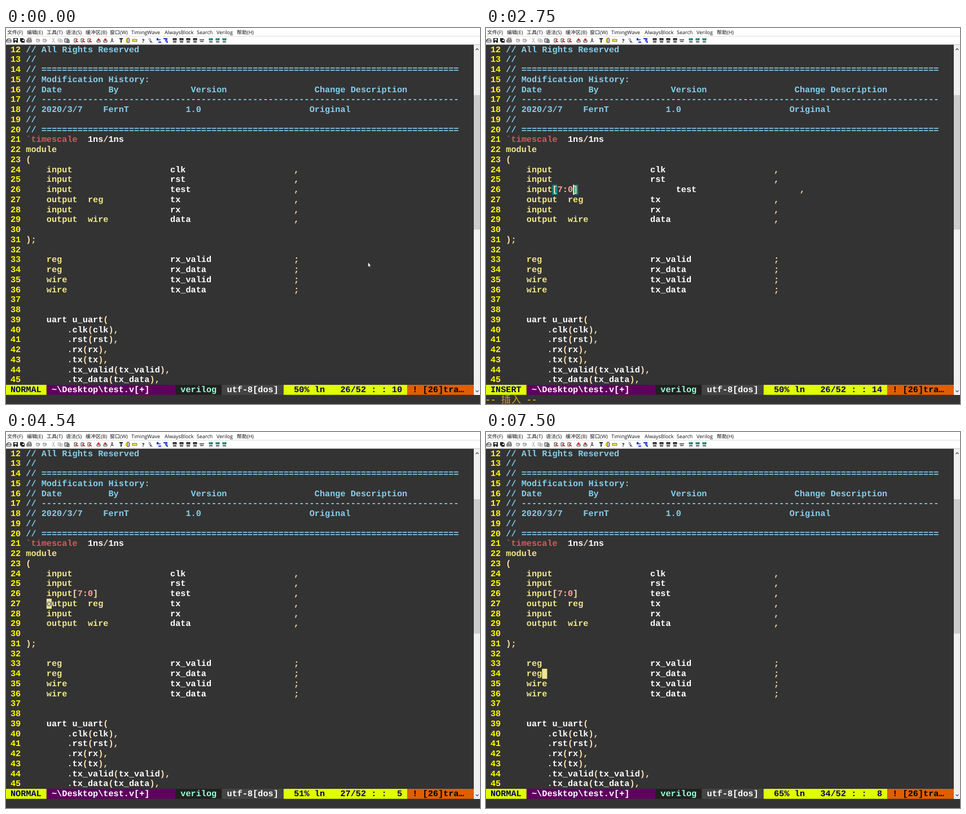
An HTML page that plays this animation: 840 px wide and 667 px high, repeating every 8 s.

```html
<!DOCTYPE html>
<html lang="zh">
<head>
<meta charset="utf-8">
<style>
html, body { margin: 0; width: 840px; height: 667px; overflow: hidden; background: #333; }
svg { display: block; }
text { white-space: pre; text-rendering: geometricPrecision; }
.code { font: bold 15.22px "Liberation Mono", "Courier New", monospace; }
.menu { font: 9px "Open Sans", "Noto Sans", "Noto Sans CJK SC", "Noto Sans CJK", sans-serif; fill: #111; }
.cjk { font: 17px "Noto Sans CJK SC", "Noto Sans CJK", sans-serif; }
</style>
</head>
<body>
<svg id="stage" width="840" height="667" viewBox="0 0 840 667">
<text class="code" x="537.65" y="149" fill="#87ceeb">Original</text>
</svg>
<script>
const LOOP = 8000, CW = 9.133, RH = 17.75, LEFT = -1.2, GUTTER = 4;
const C = {
  comment: '#87ceeb', key: '#f0e68c', pre: '#cd5c5c', num: '#ffa0a0', punct: '#ffdead',
  text: '#ffffff', line: '#ffff00', match: '#008b8b', under: '#708090', msg: '#daa520'
};
const stage = document.getElementById('stage');

function add(parent, tag, attrs, content) {
  const el = document.createElementNS('http://www.w3.org/2000/svg', tag);
  for (const k in attrs) el.setAttribute(k, attrs[k]);
  if (content !== undefined) el.textContent = content;
  parent.appendChild(el);
  return el;
}
const rect = (p, x, y, width, height, fill) => add(p, 'rect', { x, y, width, height, fill });
const path = (p, d, fill, stroke, w = 1) =>
  add(p, 'path', { d, fill: fill || 'none', stroke: stroke || 'none', 'stroke-width': w });
const cellX = c => LEFT + c * CW;
const rowY = r => 278 + (r - 26) * RH;
const put = (p, c, r, s, fill) =>
  add(p, 'text', { class: 'code', x: cellX(c), y: rowY(r) + 13, fill }, s);
const fillCells = (p, c, r, n, fill) => rect(p, cellX(c), rowY(r), n * CW, RH, fill);

// Pairs of column and text become one padded line.
function cols(...parts) {
  let s = '';
  for (let i = 0; i < parts.length; i += 2) s = s.padEnd(parts[i]) + parts[i + 1];
  return s;
}
const decl = (kind, name, end) => cols(4, kind, 28, name, 52, end);
const port = name => cols(8, `.${name}(${name}),`);
const rule = ch => '// ' + ch.repeat(81);

const lines = [
  '// All Rights Reserved', '//', rule('='), '// Modification History:',
  cols(0, '// Date', 16, 'By', 32, 'Version', 56, 'Change Description'),
  rule('-'),
  cols(0, '// 2020/3/7', 15, 'FernT', 31, '1.0'),
  '//', rule('='),
  '`timescale  1ns/1ns', 'module', '(',
  decl('input', 'clk', ','), decl('input', 'rst', ','), decl('input', 'test', ','),
  decl('output  reg', 'tx', ','), decl('input', 'rx', ','), decl('output  wire', 'data', ','),
  '', ');', '',
  decl('reg', 'rx_valid', ';'), decl('reg', 'rx_data', ';'),
  decl('wire', 'tx_valid', ';'), decl('wire', 'tx_data', ';'),
  '', '', cols(4, 'uart u_uart('),
  ...['clk', 'rst', 'rx', 'tx', 'tx_valid', 'tx_data'].map(port)
];

function colorOf(tok) {
  if (/^(module|input|output|reg|wire)$/.test(tok)) return C.key;
  if (tok[0] === '`') return C.pre;
  if (/^\d+$/.test(tok)) return C.num;
  return /^\w/.test(tok) ? C.text : C.punct;
}
function drawLine(p, row, s) {
  const note = s.startsWith('//');
  for (const m of s.matchAll(note ? /\S+/g : /`?\w+|[^\w\s]/g))
    put(p, GUTTER + m.index, row, m[0], note ? C.comment : colorOf(m[0]));
}

function drawMenu() {
  rect(stage, 0, 0, 840, 29.5, '#ffffff');
  rect(stage, 0, 14, 840, 1, '#dcdcdc');
  const items = [[2, '文件(F)'], [37, '编辑(E)'], [72, '工具(T)'], [106, '语法(S)'], [141, '缓冲区(B)'],
    [184, '窗口(W)'], [222, 'TimingWave'], [281, 'AlwaysBlock'], [338, 'Search'], [373, 'Verilog'], [409, '帮助(H)']];
  for (const [x, s] of items) add(stage, 'text', { class: 'menu', x, y: 11 }, s);
}

// Each icon is drawn around its own centre.
const icons = {
  open: g => path(g, 'M-4 3V-1H-2V-3H2L4 -1V3ZM-4 0H4', '#fff', '#222'),
  disk: g => { rect(g, -4, -4, 8, 8, '#222'); rect(g, -2, -3, 4, 3, '#fff'); rect(g, -1, 2, 2, 2, '#ddd'); },
  disks: g => { rect(g, -4, -4, 6, 6, '#222'); rect(g, -2, -2, 6, 6, '#222'); rect(g, 0, -1, 3, 2, '#fff'); },
  print: g => path(g, 'M-2 -1V-4H3V-1M-4 -1H4V3H-4ZM-3 1H3', '#fff', '#222'),
  turn: g => path(g, 'M-3 -2H2Q4 0 2 2Q0 4 -3 2V-3M-1 0H2', '', '#777'),
  cut: g => path(g, 'M-2 -4L2 3M2 -4L-2 3M-3 3H-1M1 3H3', '', '#aaa'),
  copy: g => path(g, 'M-4 -3H1V2H-4ZM-1 -1H4V3H-1Z', '#eee', '#aaa'),
  paste: g => path(g, 'M-4 -3H2V3H-4ZM0 -1H4V4H0Z', '#ddd', '#333'),
  find: g => { path(g, 'M-3 -3H1V3H-3Z', '#fff', '#333'); path(g, 'M-1 0L4 3M1 -2H3', '', '#c22', 1.5); },
  load: g => { path(g, 'M-3 0H3V3H-3Z', '#fff', '#333'); path(g, 'M0 -4L3 -1H1V1H-1V-1H-3Z', '#d22'); },
  run: g => path(g, 'M-1 -3H1V-1H-1ZM-3 4L0 0L3 3M-2 1L2 2', '', '#333'),
  tool: g => path(g, 'M-3 -4H3V-2H1V4H-1V-2H-3Z', '#222'),
  book: g => { rect(g, -4, -3, 8, 6, '#e9d400'); path(g, 'M-1 -4H2V4H-1Z', '#fff', '#333'); },
  tag: g => path(g, 'M-4 -2H4V2H-4Z', '#f4e42c', '#777'),
  help: g => add(g, 'text', { class: 'menu', x: -2.5, y: 3.5, style: 'font-weight:700' }, '?'),
  seek: g => path(g, 'M-3 -2Q-1 -5 1 -2Q0 0 -2 0M0 1H2V3H0ZM2 3L4 4', '', '#333'),
  tree: g => { rect(g, -4, -4, 3, 4, '#1c35c8'); rect(g, -1, -2, 4, 2, '#4d68e8'); rect(g, -1, 2, 5, 2, '#1c35c8'); },
  grid: g => { rect(g, -4, -4, 7, 2, '#1c35c8'); rect(g, -1, -2, 4, 4, '#4d68e8'); rect(g, 1, 2, 3, 2, '#1c35c8'); },
  chip: g => { rect(g, -3.5, -4, 7, 4, '#222'); rect(g, -2, -2, 4, 1, '#888'); path(g, 'M-3 2.5H3', '', '#222', 2); },
  dash: g => path(g, 'M-4 -1H4M-3 2H3', '', '#333', 1.4),
  teal: g => { rect(g, -3.5, -4, 7, 4, '#17806f'); rect(g, -2, -3, 3, 1, '#8ed0c2'); path(g, 'M-3 2.5H3', '', '#222', 1.6); }
};
// First centre of each run; icons in a run stand 12 apart.
const runs = [[5, 'open disk disks print'], [57, 'turn turn'], [84, 'cut copy paste'],
  [124, 'find find find'], [164, 'load load run'], [204, 'tool book tag'], [243.5, 'help seek'],
  [271, 'tree grid'], [299, 'chip chip chip chip dash'], [363, 'teal teal teal']];
function drawTools() {
  for (const [x, names] of runs)
    names.split(' ').forEach((name, i) =>
      icons[name](add(stage, 'g', { transform: `translate(${x + i * 12} 22)` })));
}

function drawScroll() {
  rect(stage, 829, 29.5, 11, 621.5, '#f0f0f0');
  rect(stage, 829, 119, 11, 238.5, '#cdcdcd');
  path(stage, 'M832.5 39L835 36.5L837.5 39', '', '#555', 1.3);
  path(stage, 'M832.5 643L835 645.5L837.5 643', '', '#555', 1.3);
}

function drawStatus() {
  const parts = [[0, 8, '#dfff00'], [8, 25, '#5f005f'], [33, 9, '#202020'],
    [42, 12, '#444444'], [54, 24, '#dfff00'], [78, 13, '#df5f00']];
  for (const [c, n, fill] of parts) fillCells(stage, c, 46, n, fill);
  put(stage, 9, 46, '~\\Desktop\\test.v[+]', '#ffffff');
  put(stage, 34, 46, 'verilog', '#9cffd3');
  put(stage, 43, 46, 'utf-8[dos]', '#ffffff');
  put(stage, 60, 46, 'ln', '#00005f');
  put(stage, 71, 46, ': :', '#00005f');
  put(stage, 79, 46, '!', '#000000');
  put(stage, 81, 46, '[26]tra…', '#000000');
}

drawMenu();
drawTools();
lines.forEach((s, i) => {
  put(stage, 1, i + 12, String(i + 12), C.line);
  if (i !== 14) drawLine(stage, i + 12, s);
});
drawStatus();
drawScroll();
const live = add(stage, 'g', {});
const mouse = path(stage, 'M641.5 415.5V424L643.4 422.3L644.6 425L645.8 424.5L644.7 421.9H647Z', '#ffffff', '#111111', 0.5);

// time, row, column, cursor shown, typed text
const typing = [
  [90, 26, 10, 1, ''], [760, 26, 10, 0, ''], [1020, 26, 11, 1, '['], [1160, 26, 12, 1, '[]'],
  [1630, 26, 11, 1, '[]'], [2200, 26, 12, 1, '[7]'], [2470, 26, 13, 1, '[7:]'], [2750, 26, 14, 1, '[7:0]']
];
// time, row, column, cursor shown
const moves = [
  [3090, 26, 13, 1], [3820, 26, 13, 0], [3880, 26, 5, 1], [3930, 27, 5, 1], [4460, 26, 5, 1],
  [4540, 27, 5, 1], [5050, 28, 5, 1], [5110, 30, 1, 1], [5170, 32, 1, 1], [5490, 33, 5, 1],
  [5830, 33, 6, 1], [5950, 33, 7, 1], [6670, 32, 1, 1], [7040, 33, 7, 1], [7190, 34, 7, 1], [7500, 34, 8, 1]
];
const ALIGN = 3880;
const steps = [[0, 26, 10, 0, '', 'NORMAL'], ...typing.map(s => [...s, 'INSERT']),
  ...moves.map(s => [...s, '[7:0]', 'NORMAL'])];

function show([time, row, col, cursor, typed, mode]) {
  live.replaceChildren();
  mouse.style.display = time ? 'none' : '';
  const insert = mode === 'INSERT';
  const shift = time >= ALIGN ? 0 : typed.length;
  const edited = cols(4, 'input' + typed, 28 + shift, 'test', 52 + shift, ',');
  if (insert && typed.length > 1)
    for (const c of [9, 8 + typed.length]) fillCells(live, GUTTER + c, 26, 1, C.match);
  drawLine(live, 26, edited);

  const cell = GUTTER + col - 1;
  if (cursor && insert) rect(live, cellX(cell), rowY(row), 2.4, RH, C.key);
  else if (cursor) {
    fillCells(live, cell, row, 1, C.key);
    const s = row === 26 ? edited : lines[row - 12];
    put(live, cell, row, s[col - 1] || '', C.under);
  }

  put(live, 1, 46, mode, '#00005f');
  put(live, 56, 46, Math.floor(row / 52 * 100) + '%', '#00005f');
  put(live, 65, 46, row + '/52', '#00005f');
  put(live, 74, 46, String(col).padStart(3), '#00005f');
  if (insert) {
    put(live, 0, 47, '--', C.msg);
    put(live, 8, 47, '--', C.msg);
    [...'插入'].forEach((s, i) =>
      add(live, 'text', { class: 'cjk', x: cellX(3 + 2 * i) + 0.6, y: 665, fill: C.msg }, s));
  }
}

let current = null;
function tick() {
  const t = performance.now() % LOOP;
  const step = steps.findLast(s => s[0] <= t);
  if (step !== current) show(current = step);
  requestAnimationFrame(tick);
}
tick();
</script>
</body>
</html>
```
